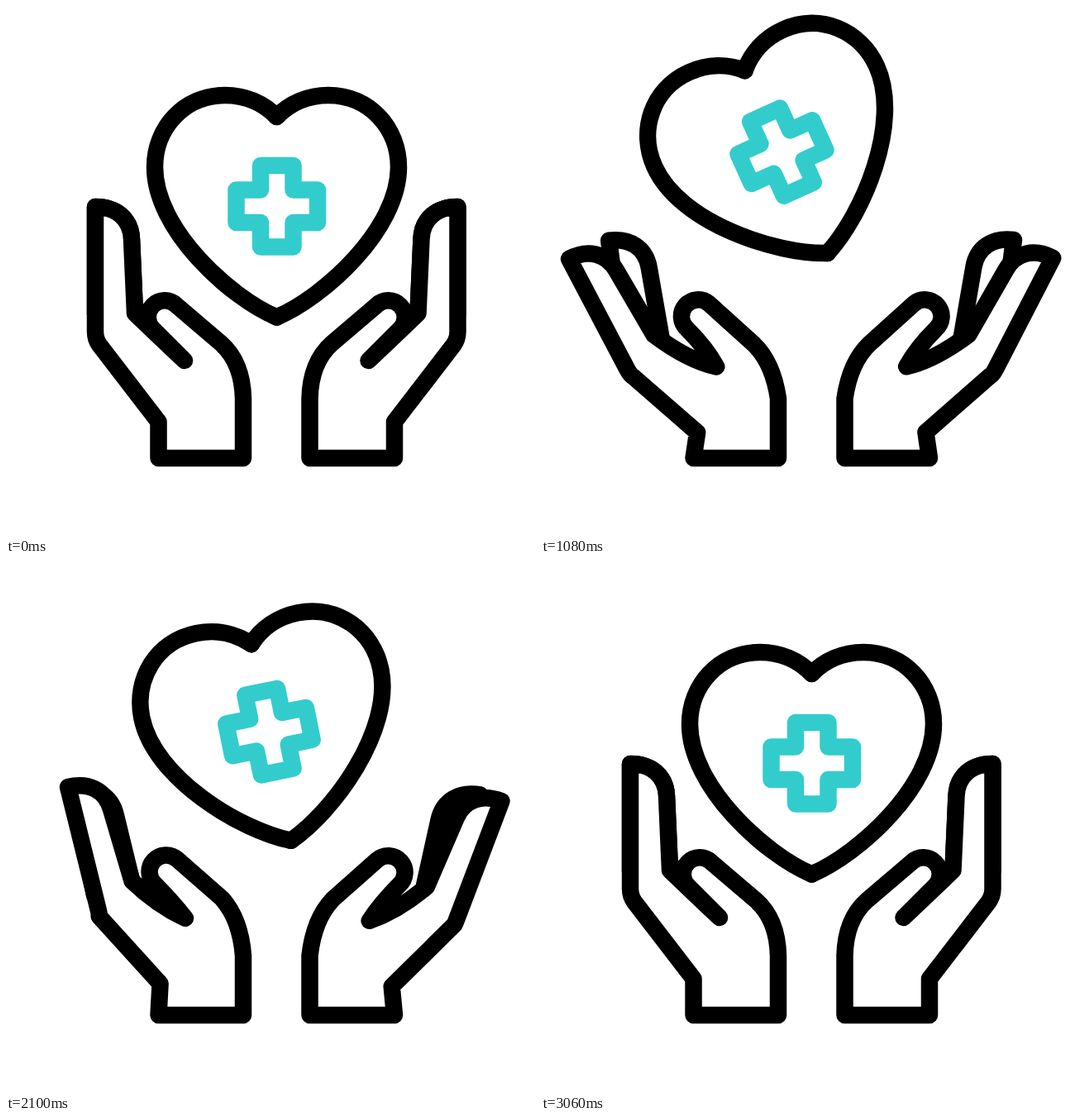
These frames come from a looping animation (640x640 px, 3100 ms). An HTML page:

```html
<!DOCTYPE html>
<html lang="en">
<head>
<meta charset="utf-8">
<title>Heart held by two hands</title>
<style>
  html, body { margin: 0; height: 100%; overflow: hidden; background: #fff; }
  svg { display: block; width: 100%; height: 100%; }
  path { fill: #fff; stroke: #000; stroke-width: 20.5; stroke-linejoin: round; stroke-linecap: round; }
  #heart path { fill: none; }
  #heart #cross { stroke: #33cccc; }
</style>
</head>
<body>
<svg viewBox="0 0 640 640">
  <g id="left"><path/><path/></g>
  <g id="right" transform="matrix(-1 0 0 1 654.5 0)"><path/><path/></g>
  <g id="heart">
    <path id="lobe" d="M327.5 134C312 118 290 108 265 108C215 108 180 148 180 195C180 270 270 352 327.5 376.5"/>
    <use href="#lobe" transform="matrix(-1 0 0 1 655 0)"/>
    <path id="cross" d="M308 193h39.5v29.5h29.5v39.5h-29.5v29.5h-39.5v-29.5h-29.5v-39.5h29.5z"/>
  </g>
</svg>
<script>
const LOOP = 3100, LAG = 100;

const byId = id => document.getElementById(id);
const span = (t, a, b) => Math.min(1, Math.max(0, (t - a) / (b - a)));
const smooth = f => f * f * (3 - 2 * f);
const ease = (t, a, b) => smooth(span(t, a, b));

// 0 to 1 and back to 0, with the peak at b.
const bump = (t, a, b, c) => ease(t, a, b) - ease(t, b, c);

// Quick rise to a share of the height, slow drift up to 1, then a fall to 0.
const hover = (t, [rise, top, fall, land], share, skew = 1) =>
  share * ease(t, rise, top) + (1 - share) * span(t, top, fall)
  - smooth(span(t, fall, land) ** skew);

// Maps points measured from a fingertip to the stage, leaning outwards by deg.
function lean(x, y, deg) {
  const c = Math.cos(deg * Math.PI / 180), s = Math.sin(deg * Math.PI / 180);
  return (u, v) => `${x + u * c + v * s} ${y - u * s + v * c}`;
}

const finger = at => `L${at(0, 0)}C${at(25, 0)} ${at(43, 14)} ${at(44, 39)}L${at(48, 129)}`;

function backFinger(open, shut) {
  const at = lean(108 - 28 * open - 23 * shut, 243 + 44 * open + 19 * shut, 8 * open + 14 * shut);
  return `M${at(0, 130)}${finger(at)}Z`;
}

function palm(open, shut) {
  const at = lean(108 - 80 * open, 243 + 68 * open, 30 * open + 3 * shut);
  const p = (x, y, dx, dy) => `${x + dx * open} ${y + dy * open}`;
  const thumb = (x, y, dx, dy) => p(x + 5 * shut, y - 5 * shut, dx, dy);
  return `M184.5 547L${p(184.5, 503, 5, 14)}L${p(113, 410, -1, 42)}Q${at(0, 160)} ${at(0, 151)}`
    + finger(at)
    + `Q${p(186, 401, -9, 30)} ${thumb(216, 429, -4, 8)}`
    + `Q${thumb(197, 410, 3, 4)} ${thumb(178, 391, -1, 0)}`
    + `A20 20 0 0 1 ${thumb(206, 362, -3, -2)}L${thumb(260, 408, -3, 1)}`
    + `Q${p(286, 431, -6, 0)} 287 475V547Z`;
}

function drawHand(id, t) {
  const [back, front] = byId(id).children;
  const open = 1.03 * hover(t, [200, 440, 1740, 2460], .8);
  const shut = bump(t, 1740, 2460, 2900);
  back.setAttribute('d', backFinger(open, shut));
  front.setAttribute('d', palm(open - .2 * shut, shut));
}

function drawHeart(t) {
  const times = [410, 690, 1760, 2420];
  const landing = bump(t, 1760, 2420, 2740);
  const x = -41.7 * hover(t, times, .79, .55);
  const y = 7 * bump(t, 0, 410, 690) - 68.3 * hover(t, times, .936, 1.35) + 10 * landing;
  const turn = 3.3 * landing - 27.7 * hover(t, times, .81);
  byId('heart').setAttribute('transform', `translate(${x} ${y}) rotate(${turn} 327.5 242.5)`);
}

const start = performance.now();
function frame() {
  const t = (performance.now() - start) % LOOP;
  drawHand('left', t);
  drawHand('right', t - LAG);
  drawHeart(t);
  requestAnimationFrame(frame);
}
frame();
</script>
</body>
</html>
```
